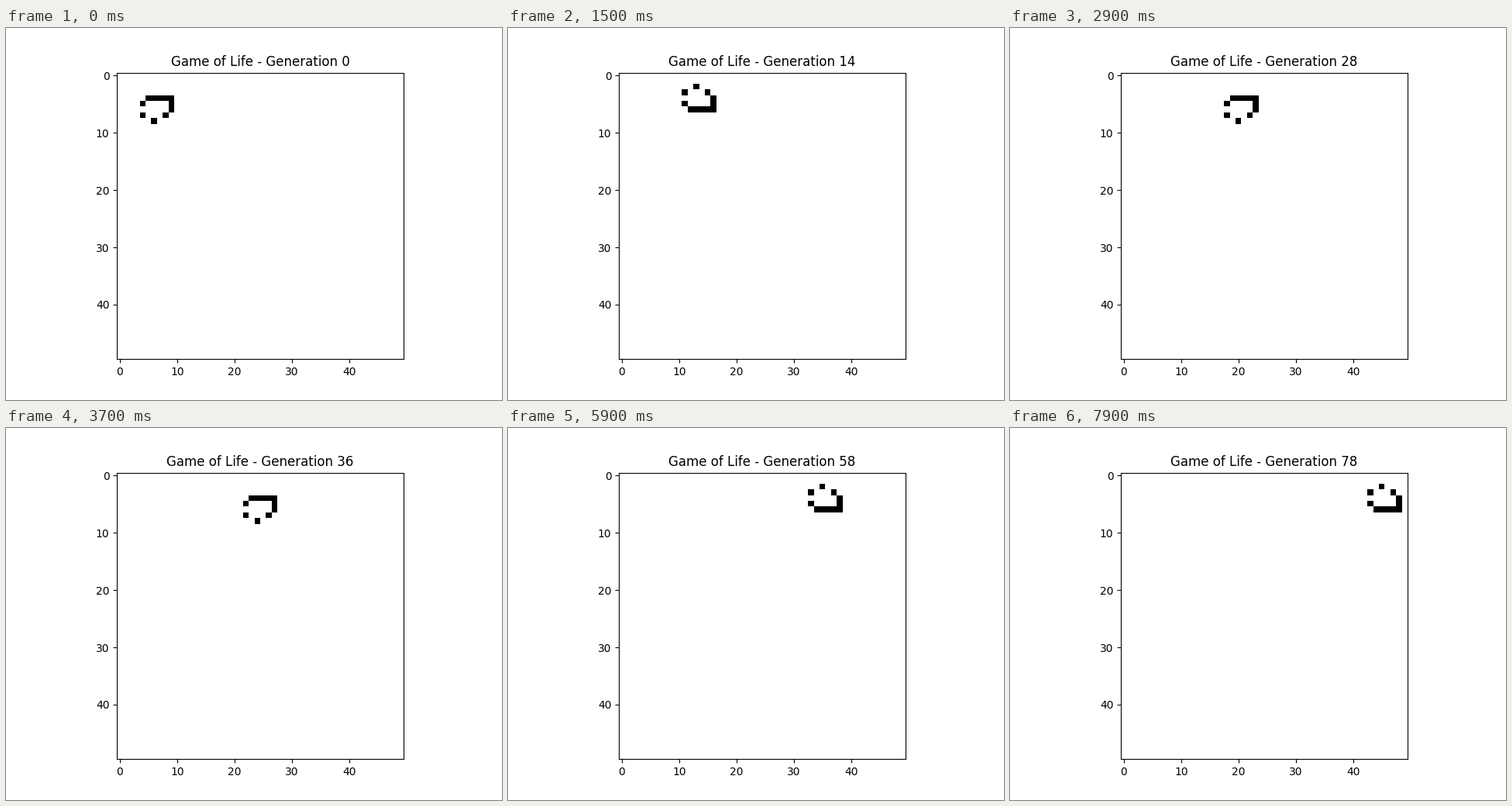
Write a matplotlib script that moves like this. It is 640 px wide and 480 px high and loops after 8000 ms.

```python
import numpy as np
import matplotlib.pyplot as plt
from matplotlib.animation import FuncAnimation

SIZE = 50
FRAMES = 80
INTERVAL = 100

SHIP = [
    ".#####",
    "#....#",
    ".....#",
    "#...#.",
    "..#...",
]


def first_grid(row=4, col=4):
    grid = np.zeros((SIZE, SIZE), dtype=int)
    ship = np.array([[c == "#" for c in line] for line in SHIP])
    h, w = ship.shape
    grid[row:row + h, col:col + w] = ship
    return grid


def step(grid):
    near = sum(
        np.roll(grid, (dy, dx), axis=(0, 1))
        for dy in (-1, 0, 1)
        for dx in (-1, 0, 1)
        if (dy, dx) != (0, 0)
    )
    return ((near == 3) | ((grid == 1) & (near == 2))).astype(int)


generations = [first_grid()]
while len(generations) < FRAMES - 1:
    generations.append(step(generations[-1]))

fig, ax = plt.subplots(figsize=(6.4, 4.8), dpi=100)
image = ax.imshow(generations[0], cmap="binary", vmin=0, vmax=1)
title = ax.set_title("Game of Life - Generation 0")


def update(frame):
    # The starting pattern is held for two frames.
    gen = max(frame - 1, 0)
    image.set_data(generations[gen])
    title.set_text(f"Game of Life - Generation {gen}")
    return image, title


anim = FuncAnimation(fig, update, frames=FRAMES, interval=INTERVAL,
                     repeat=True, repeat_delay=0, blit=False)
plt.show()
```
